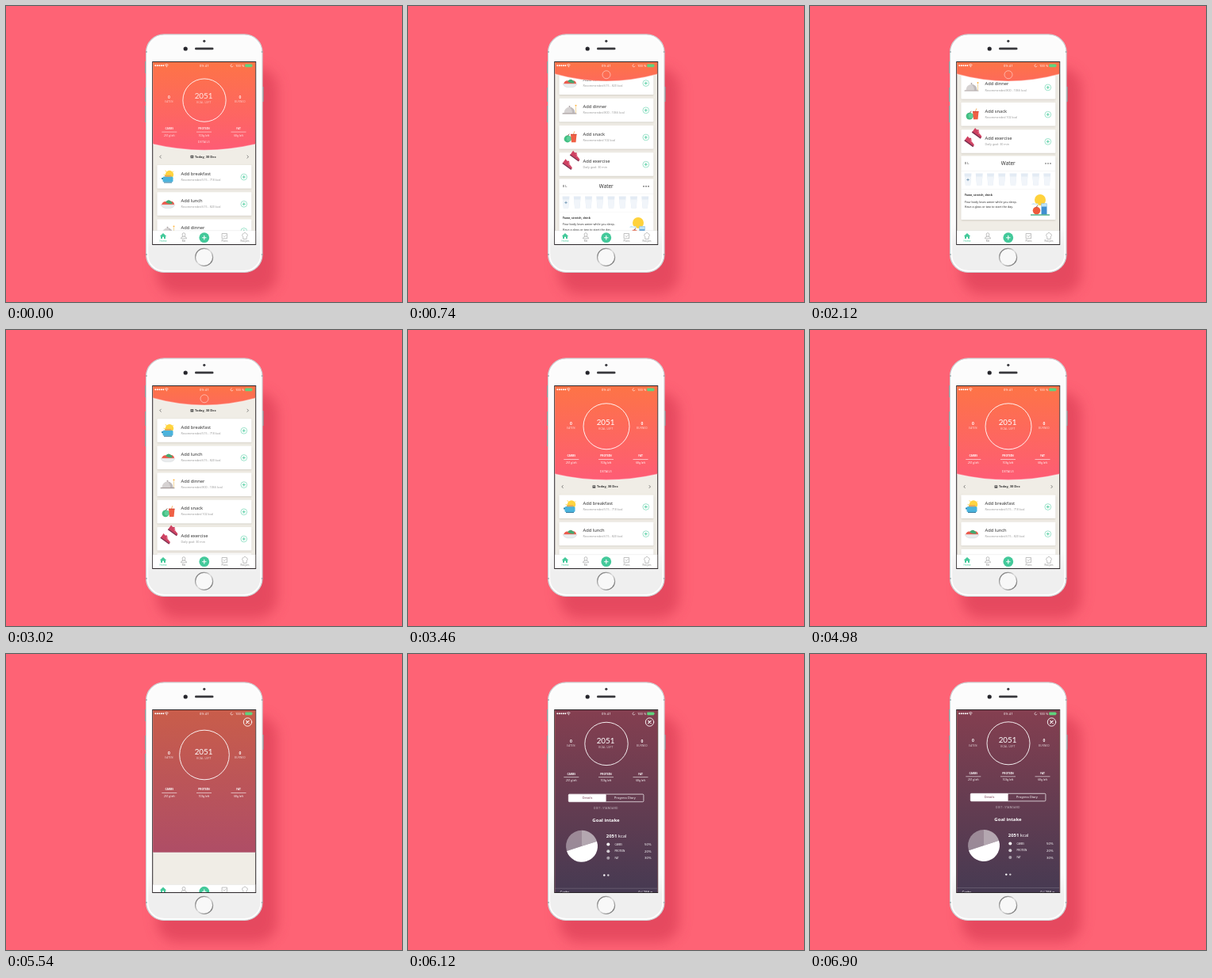
Recreate the animation shown at these times as an HTML page. Size 499x374 px, loop 6920 ms.

```html
<!DOCTYPE html>
<html lang="en">
<head>
<meta charset="utf-8">
<title>Meal diary</title>
<style>
  html, body { margin: 0; width: 100%; height: 100%; overflow: hidden; background: #fe6375; }
  svg { display: block; width: 100vw; height: 100vh; }
  text { font-family: "Noto Sans", "Open Sans", sans-serif; fill: #333; }
  .w text, text.w { fill: #fff; }
  .b { font-weight: 700; }
  .mid { text-anchor: middle; }
  .end { text-anchor: end; }
  .thin { font-family: Lato, sans-serif; }
  .grey { fill: #999; }
  .caps { letter-spacing: .35px; }
  .line { fill: none; stroke-linecap: round; stroke-linejoin: round; }
</style>
</head>
<body>
<svg viewBox="0 0 499 374" xmlns="http://www.w3.org/2000/svg">
  <defs>
    <linearGradient id="warm" gradientUnits="userSpaceOnUse" x1="0" x2="0" y1="70">
      <stop stop-color="#fd7446"/><stop offset="1" stop-color="#fe5c75"/>
    </linearGradient>
    <linearGradient id="dusk" x2="0" y2="1">
      <stop stop-color="#853f50"/><stop offset="1" stop-color="#463a52"/>
    </linearGradient>
    <linearGradient id="metal" x2="1" y2="1">
      <stop stop-color="#555"/><stop offset=".5" stop-color="#ddd"/><stop offset="1" stop-color="#555"/>
    </linearGradient>
    <linearGradient id="shell" x2="0" y2="1">
      <stop offset=".8" stop-color="#fcfcfc"/><stop offset=".9" stop-color="#efefef"/>
    </linearGradient>
    <filter id="blur" x="-30%" y="-20%" width="160%" height="140%"><feGaussianBlur stdDeviation="8"/></filter>
    <filter id="soft" x="-10%" y="-20%" width="120%" height="150%">
      <feDropShadow dx="0" dy=".8" stdDeviation=".9" flood-color="#6b5f50" flood-opacity=".25"/>
    </filter>
    <clipPath id="screen"><rect x="185.2" y="71" width="129" height="230"/></clipPath>
  </defs>

  <rect width="499" height="374" fill="#fe6375"/>
  <rect x="190" y="78" width="152" height="286" rx="26" fill="#d0304c" opacity=".52" filter="url(#blur)"/>

  <!-- phone body -->
  <path d="M175 70h2v15h-2zM175 103h2v18h-2zM175 126h2v21h-2zM322.600 102h2v19h-2z" fill="#8b9a99"/>
  <rect x="176.600" y="35.900" width="146.400" height="300.600" rx="22.500" fill="url(#shell)" stroke="#cfd1d4" stroke-width="1.200"/>
  <rect x="178.400" y="37.700" width="142.800" height="297" rx="20.800" fill="none" stroke="#fff" stroke-width="1.600"/>
  <path d="M176 58h1.800M321.800 58h1.800M176 314h1.800M321.800 314h1.800" stroke="#9ca1a6" stroke-width="1.400"/>
  <circle cx="249.800" cy="44.300" r="1.600" fill="#3b3b40"/>
  <circle cx="226.200" cy="54" r="2.600" fill="#26262c"/>
  <rect x="238" y="52.600" width="23.500" height="2.600" rx="1.300" fill="#37373b"/>
  <circle cx="249.600" cy="317.400" r="11" fill="#f8f8f8" stroke="url(#metal)" stroke-width="1.200"/>
  <rect x="184.200" y="70" width="131" height="232" fill="#2a2528"/>

  <g clip-path="url(#screen)">
    <rect x="185" y="70" width="130" height="232" fill="#f0ede6"/>
    <g id="list"></g>
    <g id="tabs"></g>
    <path id="head" fill="url(#warm)" stroke="#fff" stroke-opacity=".35" stroke-width="1.400"/>
    <path id="dark" fill="url(#dusk)"/>
    <circle id="ring" cx="250" fill="none" stroke="#fff" stroke-width="1"/>
    <g id="nums" class="w"></g>
    <g id="macros" class="w"></g>
    <g id="more" class="w"></g>
    <g id="panel" class="w"></g>
    <g id="close" class="line" stroke="#fff">
      <circle cx="304.500" cy="86" r="5.200" stroke-width=".9"/>
      <path d="M302.800 84.300l3.400 3.400m0-3.400l-3.400 3.400" stroke-width="1.100"/>
    </g>
    <g id="status" class="w"></g>
  </g>
</svg>

<script>
const LOOP = 6920;
const $ = id => document.getElementById(id);
const GREEN = '#43c99a';

// Text whose visual middle sits at y
const txt = (x, y, size, str, cls = '', extra = '') =>
  `<text x="${x}" y="${y + size * .35}" font-size="${size}" class="${cls}" ${extra}>${str}</text>`;
const dot = (x, y, r, fill, extra = '') => `<circle cx="${x}" cy="${y}" r="${r}" fill="${fill}" ${extra}/>`;
const box = (x, y, w, h, fill, extra = '') =>
  `<rect x="${x}" y="${y}" width="${w}" height="${h}" fill="${fill}" ${extra}/>`;
const line = (d, color, width = .8) =>
  `<path class="line" d="${d}" stroke="${color}" stroke-width="${width}"/>`;
const plus = (x, y, r, color, width) =>
  line(`M${x - r} ${y}h${2 * r}M${x} ${y - r}v${2 * r}`, color, width);
const card = (y, h) => box(190.5, y, 118.8, h, '#fff', 'rx=".8" filter="url(#soft)"');

const shoe = (x, y) => `<g transform="translate(${x} ${y}) rotate(36)">
  <path d="M-6.5-3.2l3 .8 2-1.4 3.2 3.2 4.6 1.2q1.2 1 .7 2.4h-13.5z" fill="#cf4262"/>
  <path d="M-6.6 2.6h13.6v1.4h-13.6z" fill="#7b2a4b"/>
  <path d="M-1-1.4l1.8-1M.6 0l1.8-1" stroke="#f5a9b8" stroke-width=".7"/></g>`;

// Meal pictures, drawn around the card's picture centre
const art = [
  dot(2, -3, 5.2, '#ffd43f') + line('M-3-8l1 1.5M7-7l-1 1M-5-3l2 .6', '#ffd43f') +
    box(-6.5, -.5, 13, 7, '#4bb3dc', 'rx="1.6"') + box(-4, -2.2, 8.5, 2, '#e6a85c', 'rx=".8"') +
    box(-8, 1, 2, 2, '#2f8cb8') + box(-5, 6.5, 10, 1, '#35789c'),
  '<path d="M-8 .8q2-5.500 7-3.600 2-3 5-.6 4 .2 4 4.200z" fill="#ec5a4c"/>' +
    '<path d="M-3-2.400q3-4.400 6.500-1.200 2.800 1.300 2 3.200-4.500 1-8.500-2z" fill="#43a971"/>' +
    '<path d="M-9 .8h18q-2 4.400-6 4.400h-6q-4 0-6-4.400z" fill="#e9ecee" stroke="#ccd2d5" stroke-width=".4"/>',
  '<path d="M-7.500 3.500a7 7.500 0 0 1 14 0z" fill="#d6d2d2"/>' +
    '<path d="M-.5-4a7 7.500 0 0 1 7 7.500h-3.500q0-5-3.500-7.500z" fill="#bfbabc"/>' +
    dot(-.5, -4.8, 1, '#b1a9aa') + box(-9.5, 3.5, 18, 1.2, '#a59b9b', 'rx=".6"') +
    box(7, -4.5, 1, 8, '#f3d9a2') + dot(7.5, -6, 1, '#ffb43f'),
  dot(-3, 2, 4.4, '#42bf83') + dot(-1, 1.5, 3.2, '#5dd09a') + line('M-2.500-2l1.500-2', '#6a4b36') +
    '<path d="M1-3.800h7.500l-1 10h-5.500z" fill="#ef6045"/>' + line('M4.500-4l1.200-3.300', '#f0a24a') +
    box(1, -4.2, 7.5, 1.2, '#d74a38'),
  shoe(7.5, -11) + shoe(-2, -.5)
];

const meals = [
  ['Add breakfast', 'Recommended 515 - 718 kcal'],
  ['Add lunch', 'Recommended 615 - 820 kcal'],
  ['Add dinner', 'Recommended 800 - 1066 kcal'],
  ['Add snack', 'Recommended 102 kcal'],
  ['Add exercise', 'Daily goal: 30 min']
];

function mealCard([title, note], i) {
  const y = 208.5 + i * 34.2;
  return card(y, 29.5) +
    `<g transform="translate(204 ${y + 15})">${art[i]}</g>` +
    txt(220.5, y + 10.5, 5.75, title) + txt(220.5, y + 18.4, 3.65, note, 'grey') +
    `<circle cx="299.800" cy="${y + 15}" r="3.900" fill="none" stroke="${GREEN}" stroke-width=".5"/>` +
    plus(299.8, y + 15, 1.6, GREEN, .8);
}

function cup(i) {
  const x = 199 + i * 14.25;
  return `<path d="M${x - 4.5} 400.500h9l-1.300 15h-6.400z" fill="#e3ebf4"/>` +
    `<path d="M${x - 4} 404.500h8l-1 10.500h-6z" fill="#f1f5fa"/>` + (i ? '' : plus(x, 408.5, 1.3, '#5d87a8', .7));
}

const waterCard = card(378.5, 80.5) +
  txt(194.8, 388, 4.2, '0 L') + txt(249.8, 388, 6.4, 'Water', 'mid') +
  [297, 300, 303].map(x => dot(x, 388, .8, '#555')).join('') +
  box(190.5, 397, 118.8, .4, '#e8e8e8') + box(190.5, 420, 118.8, .4, '#eee') +
  [...Array(8).keys()].map(cup).join('') +
  txt(194.8, 427.5, 3.5, 'Yawn, stretch, drink', 'b') +
  txt(194.8, 436.3, 3.65, 'Your body loses water while you sleep.') +
  txt(194.8, 442.4, 3.65, 'Have a glass or two to start the day.') +
  dot(290, 434, 7, '#ffd23c') +
  '<path d="M279 440q2-3.500 5-1 3-2 4 1z" fill="#cfe9f5"/>' +
  box(291.5, 438.5, 7, 14, '#3f8fd0') + box(291.5, 438.5, 7, 4, '#bfe2f5') +
  dot(285.5, 447.5, 4.8, '#ee5a3c') + line('M285.500 443l1-2', '#6a4b36') +
  box(278, 452.3, 24, 1.3, '#3aa57c');

$('list').innerHTML =
  line('M195.300 196.400l-1.500 1.600 1.500 1.600M304 196.400l1.500 1.600-1.500 1.600', '#555', .7) +
  box(232.5, 196.2, 3.8, 3.6, '#555', 'rx=".5"') + box(233, 197.5, 2.8, .5, '#f0ede6') +
  txt(238, 198, 4, 'Today, 30 Dec', 'b') + meals.map(mealCard).join('') + waterCard;

const tabIcons = [
  [198, 'Home', `<path d="M193.800 291l4.200-4 4.200 4h-1.200v3h-2v-2.200h-2v2.200h-2v-3z" fill="${GREEN}"/>`],
  [224, 'Me', '<ellipse cx="224" cy="289" rx="1.900" ry="2.300" fill="none" stroke="#999" stroke-width=".6"/>' +
    line('M223 291.200q-2.600.6-2.600 2.600h7.200q0-2-2.600-2.600', '#999', .6)],
  [275.5, 'Plans', line('M272.500 287.500h6v6.300h-6zM274 290.500l1.200 1.200 2-2.200', '#999', .6)],
  [301, 'Recipes', line('M298.800 294v-2.600a1.900 1.900 0 0 1 .2-3.600 2.200 2.200 0 0 1 4 0 1.900 1.900 0 0 1 .2 3.600v2.600z', '#999', .6)]
];
$('tabs').innerHTML = box(185, 284, 130, 18, '#fff') + box(185, 283.7, 130, .4, '#ddd') +
  tabIcons.map(([x, name, icon], i) =>
    icon + txt(x, 297, 3.1, name, 'mid', `style="fill:${i ? '#888' : GREEN}"`)).join('') +
  dot(249.8, 292.7, 6.4, GREEN) + plus(249.8, 292.7, 2.3, '#fff', 1.1);

$('nums').innerHTML =
  txt(249, 117, 9.8, '2051', 'mid thin') + txt(249.5, 125.3, 3.2, 'KCAL LEFT', 'mid caps', 'opacity=".8"') +
  [[205.5, 'EATEN'], [295, 'BURNED']].map(([x, name]) =>
    txt(x, 118, 5, '0', 'mid b') + txt(x, 124, 2.9, name, 'mid caps', 'opacity=".8"')).join('');

$('macros').innerHTML = [[205.8, 'CARBS', '251g left'], [249.5, 'PROTEIN', '103g left'], [293, 'FAT', '68g left']]
  .map(([x, name, left]) => txt(x, 159, 3.3, name, 'mid b') +
    box(x - 9.5, 163, 19, .7, '#fff', 'opacity=".8"') + txt(x, 167.6, 3.3, left, 'mid')).join('');

$('more').innerHTML = txt(249.5, 179.3, 3.3, 'DETAILS', 'mid caps');

// Pie slice between two shares of a full turn
function slice(from, to, alpha) {
  const at = f => `${219 + 20 * Math.sin(f * 2 * Math.PI)} ${242 - 20 * Math.cos(f * 2 * Math.PI)}`;
  return `<path d="M219 242L${at(from)}A20 20 0 0 1 ${at(to)}z" fill="#fff" opacity="${alpha}"/>`;
}
$('panel').innerHTML =
  '<rect x="202.300" y="176.300" width="94.600" height="9.600" rx="1.200" fill="none" stroke="#fff" stroke-width=".7"/>' +
  box(202.3, 176.3, 47.3, 9.6, '#fff', 'rx="1"') +
  txt(226, 181, 3.9, 'Details', 'mid', 'style="fill:#7a3c52"') + txt(273.3, 181, 3.9, 'Progress Diary', 'mid') +
  txt(249.5, 194.3, 3.3, 'DIET: STANDARD', 'mid caps', 'opacity=".65"') +
  txt(249.5, 209, 6, 'Goal intake', 'mid b') +
  slice(0, .2, .55) + slice(.2, .7, 1) + slice(.7, 1, .4) +
  txt(249.8, 229, 5.9, '<tspan class="b">2051</tspan> kcal') +
  [['CARBS', '50%', 1], ['PROTEIN', '20%', .75], ['FAT', '30%', .5]].map(([name, share, alpha], i) => {
    const y = 239.6 + i * 8.7;
    return dot(252.3, y, 2, '#fff', `opacity="${alpha}"`) + txt(260.5, y, 3.1, name) +
      txt(306.5, y, 4.3, share, 'end');
  }).join('') +
  dot(247.3, 278.6, 1.2, '#fff') + dot(252.3, 278.6, 1.2, '#fff', 'opacity=".75"') +
  box(185, 295, 130, .5, '#fff', 'opacity=".3"') +
  txt(191.5, 301, 4.4, 'Carbs') + txt(308, 301, 4.4, '0 / 256 g', 'end');

$('status').innerHTML = [0, 1, 2, 3, 4].map(i => dot(188.3 + i * 2.5, 75.3, 1, '#fff')).join('') +
  line('M200.400 74.300q1.900-1.600 3.800 0M201.300 75.600q1-.8 2 0', '#fff', .7) + dot(202.3, 76.7, .5, '#fff') +
  txt(250, 75.3, 4.1, '09:41', 'mid caps') +
  line('M284.300 73.800a1.600 1.600 0 1 0 1.700 2.300', '#fff', .6) + txt(289, 75.3, 4, '100 %') +
  box(301.3, 73.5, 8.7, 3.7, '#5fd47d', 'rx=".8"') + box(310.4, 74.6, .7, 1.5, '#5fd47d');

// Eased progress from 0 to 1 between two times
function ease(t, from, to) {
  const u = Math.min(1, Math.max(0, (t - from) / (to - from)));
  return u * u * (3 - 2 * u);
}
const shift = (id, y, alpha = 1) => {
  $(id).setAttribute('transform', `translate(0 ${y})`);
  $(id).setAttribute('opacity', alpha);
};

function draw(t) {
  const flick = 190 - 183 * Math.exp(-t / 409);
  const scroll = flick * (1 - ease(t, 2600, 3450));
  const fold = Math.min(scroll, 96);
  const open = ease(t, 5100, 5900);
  const settle = ease(t, 5560, 6200);
  const stretch = ease(t, 5100, 5520) * (1 - settle);

  const side = 181.5 - fold + 120 * open;
  const dip = (8 + fold / 60) * Math.max(0, 1 - open * 2);
  const shape = `M183 68H317V${side}Q249.500 ${side + 2 * dip} 183 ${side}z`;
  $('head').setAttribute('d', shape);
  $('dark').setAttribute('d', shape);
  $('dark').setAttribute('opacity', ease(t, 5200, 5950));
  $('warm').setAttribute('y2', Math.max(130, side + dip));

  const ring = $('ring');
  ring.setAttribute('cy', 121.8 - fold * .365 + stretch * 5.7 - settle * 9);
  ring.setAttribute('r', 29 - fold * .25 + stretch * 2.3 - settle * 2);
  ring.setAttribute('opacity', .9 - fold / 220);

  const fade = Math.max(0, 1 - scroll / 50);
  const leave = 1 - ease(t, 5100, 5400);
  shift('nums', -fold * .43 + stretch * 7 - settle * 8.5, fade);
  shift('macros', -fold * .57 + stretch * 12 - settle * 8.5, fade);
  shift('more', -fold + open * 30, fade * leave);
  shift('list', -scroll + open * 120, leave);
  shift('tabs', 20 * ease(t, 5250, 5950));
  shift('panel', 20 * (1 - settle), ease(t, 5650, 6100));
  $('close').setAttribute('opacity', ease(t, 5250, 5500));
}

const start = performance.now();
function tick() {
  draw((performance.now() - start) % LOOP);
  requestAnimationFrame(tick);
}
tick();
</script>
</body>
</html>
```
